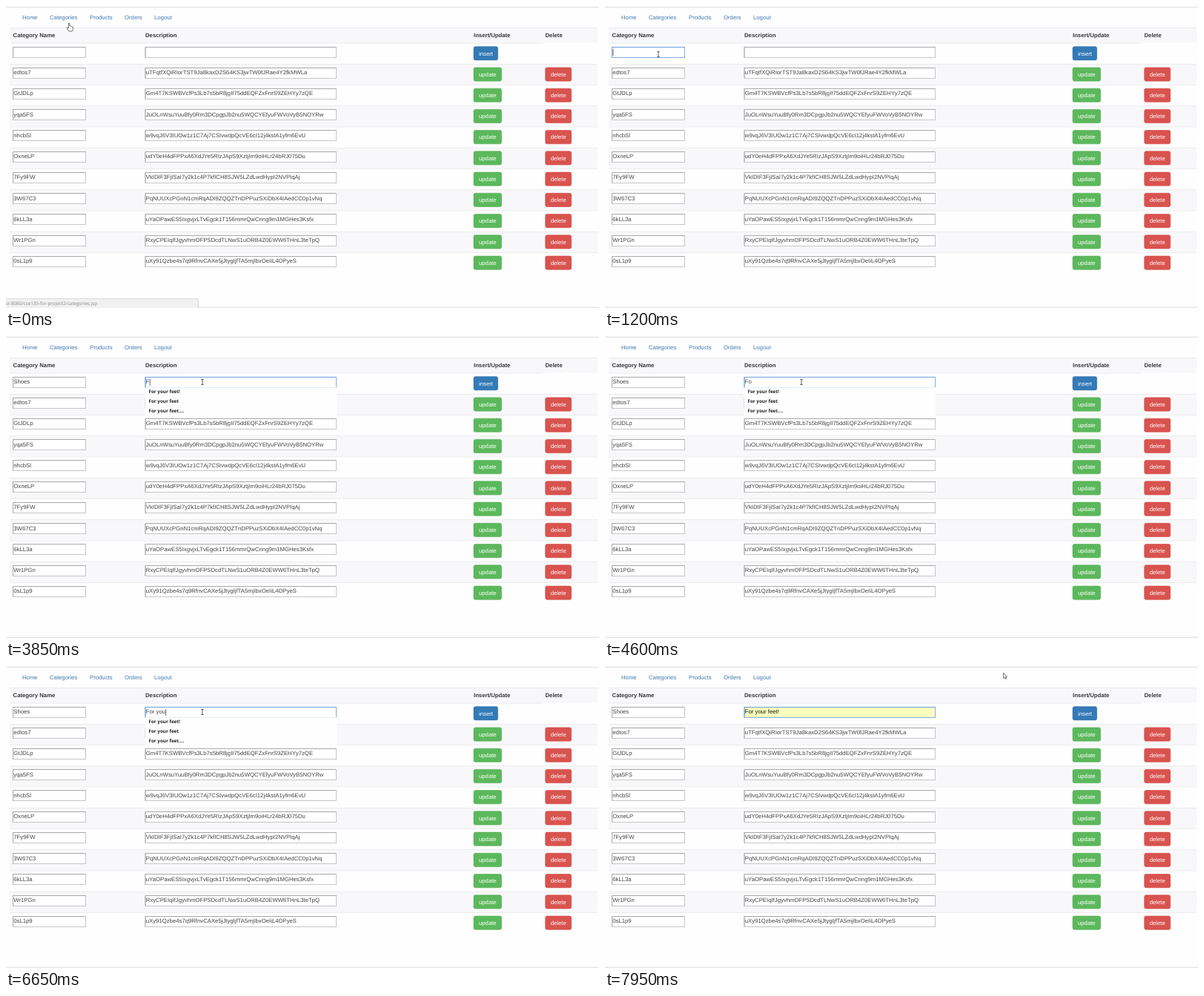
An HTML page for the animation above (8000 ms loop, 800 by 407 pixels).

```html
<!DOCTYPE html>
<html lang="en">
<head>
<meta charset="utf-8">
<title>Categories</title>
<style>
html, body { margin: 0; width: 100%; height: 100%; overflow: hidden; background: #fefefe; }
svg { display: block; }
text { font: 7.74px "Liberation Sans", Arial, sans-serif; fill: #444; white-space: pre; text-rendering: geometricPrecision; }
.nav { fill: #4279b0; }
.head { font-weight: bold; fill: #383838; }
.btn { fill: #fff; }
.tip { font: bold 6.3px "Open Sans", sans-serif; fill: #222; }
.status { font: 6.3px "Open Sans", sans-serif; fill: #858585; }
</style>
</head>
<body>
<svg id="stage" width="800" height="407" viewBox="0 0 800 407"></svg>
<script>
const stage = document.getElementById('stage');
const LOOP = 8000, TOP = 49.8, ROW = 28.23, BLINK = 530;

function add(tag, attrs, parent = stage) {
  const el = document.createElementNS('http://www.w3.org/2000/svg', tag);
  for (const k in attrs) el.setAttribute(k, attrs[k]);
  parent.appendChild(el);
  return el;
}
const box = (x, y, width, height, fill, parent) => add('rect', { x, y, width, height, fill }, parent);
function label(x, y, str, cls = '', parent) {
  const el = add('text', { x, y, class: cls }, parent);
  el.textContent = str;
  return el;
}
const show = (el, on) => el.setAttribute('visibility', on ? 'visible' : 'hidden');

function button(x, row, width, str, fill, stroke) {
  const y = TOP + ROW * row + 4.9;
  add('rect', { x, y, width, height: 18.2, rx: 2.2, fill, stroke, 'stroke-width': 0.6 });
  label(x + 7, y + 11.8, str, 'btn');
}

function field(x, row, width, str) {
  const y = Math.round(TOP + ROW * row + 4.7) + 0.5;
  const frame = add('rect', { x, y, width, height: 14, fill: '#fff', stroke: '#c6c6c6' });
  const edge = add('path', { d: `M${x} ${y + 14}V${y}H${x + width}`, fill: 'none', stroke: '#a8a8a8' });
  const text = label(x + 0.8, TOP + ROW * row + 14.2, str);
  return { x, y, frame, edge, text };
}

// Page
box(0, 1, 800, 1, '#dedee0');
box(0, 405.6, 800, 1, '#d9d9da');
[['Home', 22], ['Categories', 59], ['Products', 113], ['Orders', 160], ['Logout', 200]]
  .forEach(([s, x]) => label(x, 18, s, 'nav'));

box(5, 29.4, 793, 20.4, '#f8f8fa');
box(5, 29.2, 793, 0.6, '#e2e2e3');
[['Category Name', 9.6], ['Description', 188], ['Insert/Update', 631], ['Delete', 727.5]]
  .forEach(([s, x]) => label(x, 42.3, s, 'head'));

const rows = `edtos7 uTFqtfXQiRIorTST9Ja8kaxD2S64KS3jwTW0fJRae4Y2fkMWLa
GtJDLp Gm4T7KSWBVcfPs3Lb7s5bR8jgII75ddEQFZxFnrS9ZEHYy7zQE
yqa5FS JuOLnWsuYuuBfy0Rm3DCpgpJb2nu5WQCYEfyuFWVoVyB5NOYRw
nhcbSl w9vqJ6V3IUOw1z1C7Aj7CSIvwdpQcVE6cI12j4kstA1yfm6EvU
OxneLP udY0eH4dFPPxA6XdJYe5RIzJApS9XztjIm9oiHLr24bRJ075Du
7Fy9FW VkIDIF3FjISaI7y2k1c4P7kfICH8SJW5LZdLwdHypI2NVPIqAj
3W67C3 PqNUUXcPGnN1cmRqADI9ZQQZTnDPPuzSXiDbX4IAedCC0p1vNq
6kLL3a uYaOPawES5IxgvjxLTvEgck1T156mmrQwCnng9m1MGHes3Ksfx
Wr1PGn RxyCPEIqIfJgyvhmOFPSDcdTLNwS1uORB4Z0EWW6THnL3teTpQ
0sL1p9 uXy91Qzbe4s7q9RfnvCAXe5jJtygIjfTA5mjIbxOeIiL4OPyeS`.split('\n').map(r => r.split(' '));
rows.unshift(['', '']);

const fields = rows.map(([name, text], i) => {
  const y = TOP + ROW * i;
  if (i % 2) box(5, y, 793, ROW, '#f8f8fa');
  box(5, y, i ? 793 : 719, 0.6, '#e2e2e3');
  if (i) {
    button(631, i, 37.5, 'update', '#5cb85c', '#4cae4c');
    button(727.7, i, 35, 'delete', '#d9534f', '#d43f3a');
  } else {
    button(631, i, 32.5, 'insert', '#337ab7', '#2e6da4');
  }
  return [field(9.5, i, 98, name), field(188, i, 257.5, text)];
});
const [nameField, descField] = fields[0];

// Overlays
const caret = add('path', { stroke: '#333', 'stroke-width': 0.7 });

function dropdown(x, width, height, items) {
  const g = add('g', {});
  box(x, 69.2, width, height, '#fefefe', g);
  items.forEach((s, i) => label(x + 5, 77 + 13.2 * i, s, 'tip', g));
  return g;
}
const nameTips = dropdown(9, 99.5, 11, ['Shoes']);
const descTips = dropdown(187.5, 258.5, 39, ['For your feet!', 'For your feet', 'For your feet....']);

const status = add('g', {});
add('rect', { x: -2, y: 394.5, width: 261.5, height: 14, rx: 1.5, fill: '#f1f1f1', stroke: '#d4d4d4', 'stroke-width': 0.8 }, status);
label(0, 403.3, 'st:8080/cse135-for-project2/categories.jsp', 'status', status);

const outline = { fill: '#fff', stroke: '#333', 'stroke-width': 0.7, 'stroke-linejoin': 'round' };
const pointers = {
  hand: add('path', { ...outline, d: 'M-1.6 1V-4.5Q-.8 -5.8 0 -4.5V-1Q1 -1.8 1.6 -.6Q2.6 -1.1 3.1 0Q4.2 -.3 4.3 1V3.5L3.2 6H-1.2L-4 2Q-3.8 .3-2.6 1.2L-1.6 2Z' }),
  beam: add('path', { fill: 'none', stroke: '#333', 'stroke-width': 0.8, d: 'M-1.7 -3.4H1.7M0 -3.4V3.4M-1.7 3.4H1.7' }),
  arrow: add('path', { ...outline, d: 'M0 0V7.2L1.7 5.7L2.9 8.2L4 7.6L2.9 5.2H5Z' })
};

// Time line
const mouse = [[0, 86, 28], [350, 86, 28], [850, 72, 65], [2600, 72, 65], [2950, 272.5, 49],
  [3050, 272.5, 49], [3400, 265, 62], [7720, 265, 62], [7950, 537.5, 9.5], [8000, 537.5, 9.5]];
const nameKeys = [1500, 1750, 1880, 2010, 2150];
const descKeys = [3850, 4050, 4750, 4900, 5250, 5400, 5550];
const FOCUS_NAME = 950, FOCUS_DESC = 3500, FILLED = 6900;

function mouseAt(t) {
  const i = mouse.findIndex((m, k) => t < mouse[k + 1][0]);
  const [t0, x0, y0] = mouse[i], [t1, x1, y1] = mouse[i + 1];
  const p = (t - t0) / (t1 - t0), e = p * p * (3 - 2 * p);
  return [x0 + (x1 - x0) * e, y0 + (y1 - y0) * e];
}
const inside = (x, y) => y > 54 && y < 70 && (x > 9 && x < 108 || x > 188 && x < 446);
const typed = (str, keys, t) => str.slice(0, keys.filter(k => k <= t).length);

function paint(f, focused, filled) {
  f.frame.setAttribute('stroke', focused ? '#82aee6' : '#c6c6c6');
  f.frame.setAttribute('fill', filled ? '#faffbd' : '#fff');
  f.edge.setAttribute('stroke', focused ? '#6f9fdc' : '#a8a8a8');
  f.text.style.fill = filled ? '#111' : '';
}

function draw(t) {
  const onName = t >= FOCUS_NAME && t < FOCUS_DESC, onDesc = t >= FOCUS_DESC, filled = t >= FILLED;
  nameField.text.textContent = typed('Shoes', nameKeys, t);
  descField.text.textContent = filled ? 'For your feet!' : typed('For you', descKeys, t);
  paint(nameField, onName, false);
  paint(descField, onDesc, filled);
  show(nameTips, onName && t >= nameKeys[0]);
  show(descTips, t >= descKeys[0] && !filled);
  show(status, t < 650);

  // The caret restarts its blink after each edit
  const f = onDesc ? descField : nameField;
  const events = [FOCUS_NAME, ...nameKeys, FOCUS_DESC, ...descKeys, FILLED];
  const last = Math.max(...events.filter(e => e <= t));
  const x = f.x + 1.5 + (f.text.textContent ? f.text.getComputedTextLength() : 0);
  caret.setAttribute('d', `M${x} ${f.y + 2.5}v9`);
  show(caret, (onName || onDesc) && Math.floor((t - last) / BLINK) % 2 === 0);

  const [mx, my] = mouseAt(t);
  const kind = inside(mx, my) ? 'beam' : my < 35 && mx < 100 ? 'hand' : 'arrow';
  for (const k in pointers) {
    show(pointers[k], k === kind);
    pointers[k].setAttribute('transform', `translate(${mx} ${my})`);
  }
}

const start = performance.now();
function tick(now) {
  draw(Math.max(0, now - start) % LOOP);
  requestAnimationFrame(tick);
}
draw(0);
requestAnimationFrame(tick);
</script>
</body>
</html>
```
